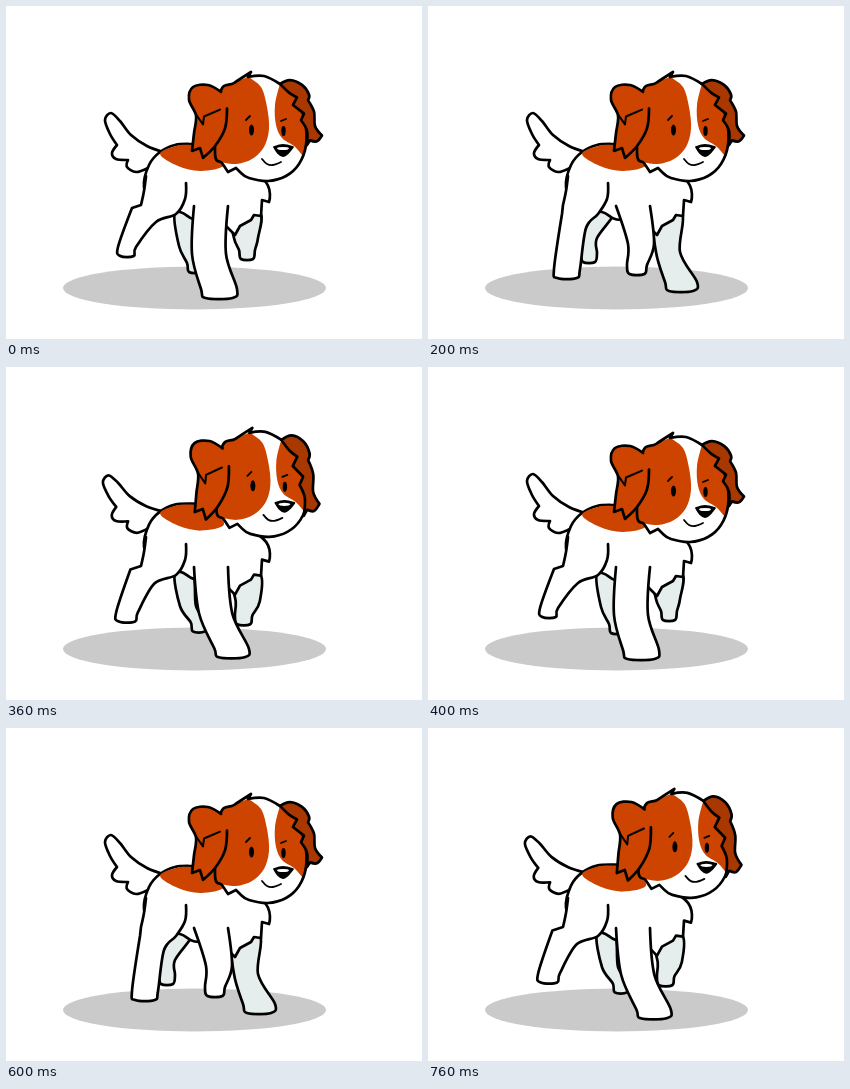
Recreate the animation shown at these times as an HTML page with a canvas. Size 416x333 px, loop 0.8 s.

```html
<!DOCTYPE html>
<html lang="en">
<head>
<meta charset="utf-8">
<title>Walking puppy</title>
<style>
html, body { margin: 0; width: 100%; height: 100%; overflow: hidden; background: #fff; }
canvas { display: block; }
</style>
</head>
<body>
<canvas id="stage" width="416" height="333"></canvas>
<script>
const ctx = document.getElementById('stage').getContext('2d');
const CYCLE = 400, STEP = 40;
const ORANGE = '#cc4400', DARK_ORANGE = '#a83800', GREY = '#e6eeed', WHITE = '#fff';

const point = (x, y, sharp = false) => ({ x, y, sharp });

// A "*" after a point makes it a sharp corner.
const parse = text => text.split(' ').map(p => {
  const [x, y] = p.replace('*', '').split(',').map(Number);
  return point(x, y, p.endsWith('*'));
});

const tail = parse('157,145 141,139 125,128 114,114 105,106 99,113 104,127 111,138* 106,146 110,152 122,153* 121,160 130,165 142,161');
const trunk = parse('200,138 186,137 169,138 154,145 143,158 138,180 148,202 174,205 187,212 206,214 219,218');
const chest = parse('219,218 229,228* 234,219* 245,213* 248,208* 255,209* 256,193* 263,195* 257,172 200,139');
const saddle = parse('154,147 170,139 186,138 205,140 218,158 195,164 172,159');
const skull = parse('214,86 228,76 245,65* 242,70* 258,69 274,77* 290,90 299,115 300,138 293,157 280,169 262,174 243,171 235,166* 230,161* 222,165* 216,156 209,146');
const leftPatch = parse('214,86 228,76 242,70* 255,80 261,100 263,122 258,140 246,152 230,157 215,155* 208,145');
const rightPatch = parse('274,77* 290,90 299,115 301,140* 297,149* 288,139 276,131 270,118 269,98');
const leftEar = parse('215,85 202,78 187,80 183,93 190,109 188,127 186,145* 194,142* 197,152* 209,140 219,122 221,102');
const tuft = parse('190,108 197,118* 198,110* 214,103');
const rightEar = parse('274,77 284,73 296,78 303,88 302,94* 308,106 309,121 316,131* 311,137 304,136* 301,141* 301,126 295,115* 298,108* 287,99* 291,91* 283,86 275,78');
const nose = parse('268,140* 277,138 287,140* 282,146 277,149 272,146');
const mouth = parse('256,152 261,157 267,158 275,155');
const brows = ['240,113 244,109', '275,114 280,112'].map(parse);

function trace(points, closed) {
  const n = points.length;
  const tangent = i => {
    if (points[i].sharp || (!closed && (i === 0 || i === n - 1))) return [0, 0];
    const a = points[(i + n - 1) % n], b = points[(i + 1) % n];
    return [(b.x - a.x) / 6, (b.y - a.y) / 6];
  };
  ctx.beginPath();
  ctx.moveTo(points[0].x, points[0].y);
  for (let i = 0; i < (closed ? n : n - 1); i++) {
    const j = (i + 1) % n, p = points[i], q = points[j];
    const [ax, ay] = tangent(i), [bx, by] = tangent(j);
    ctx.bezierCurveTo(p.x + ax, p.y + ay, q.x - bx, q.y - by, q.x, q.y);
  }
}

function draw(points, { fill, line = 2.7, closed = false }) {
  trace(points, closed);
  if (fill) { ctx.fillStyle = fill; ctx.fill(); }
  if (line) { ctx.lineWidth = line; ctx.stroke(); }
}

function oval(x, y, rx, ry, color) {
  ctx.fillStyle = color;
  ctx.beginPath();
  ctx.ellipse(x, y, rx, ry, 0, 0, 2 * Math.PI);
  ctx.fill();
}

function moved(x, y, angle, paint) {
  ctx.save();
  ctx.translate(x, y);
  ctx.rotate(angle);
  paint();
  ctx.restore();
}

const paw = (foot, w) => [
  point(foot.x - w, foot.y - 6), point(foot.x - 0.75 * w, foot.y + 3),
  point(foot.x + 0.75 * w, foot.y + 3), point(foot.x + w, foot.y - 6)];

const limb = (hip, hipW, knee, kneeW, foot, footW) => [
  point(hip.x - hipW, hip.y), point(knee.x - kneeW, knee.y),
  ...paw(foot, footW),
  point(knee.x + kneeW, knee.y), point(hip.x + hipW, hip.y)];

const hindLimb = (hock, foot, footW) => [
  point(180, 177), point(179, 193), point(170, 208), point(hock.x + 13, hock.y + 4),
  ...paw(foot, footW).reverse(),
  point(hock.x - 11, hock.y - 10, true), point(135, 199, true), point(138, 185), point(140, 170)];

// Ears follow the head at the top and trail behind it toward the tip.
const flap = (ear, head, trailX, trailY) => ear.map(p => {
  const k = (p.y - 76) / 68;
  return point(p.x + head.x * (1 + trailX * k), p.y + head.y * (1 + trailY * k), p.sharp);
});

function drawFace() {
  draw(skull, { fill: WHITE, line: 0, closed: true });
  draw(leftPatch, { fill: ORANGE, line: 0, closed: true });
  draw(rightPatch, { fill: ORANGE, line: 0, closed: true });
  draw(skull, { closed: true });
  oval(245.5, 123, 2.5, 5.5, '#000');
  oval(277.5, 124, 2.2, 5, '#000');
  for (const brow of brows) draw(brow, { line: 1.8 });
  draw(nose, { fill: '#000', line: 1.8, closed: true });
  oval(277, 141.5, 6, 1.6, WHITE);
  draw(mouth, { line: 1.8 });
}

function render(t) {
  const a = 2 * Math.PI * t / CYCLE;
  // One stride per cycle, with an optional second harmonic for two steps.
  const wave = (mean, c, s = 0, c2 = 0, s2 = 0) => mean +
    c * Math.cos(a) + s * Math.sin(a) + c2 * Math.cos(2 * a) + s2 * Math.sin(2 * a);

  const bob = wave(-1, 0, 0, 2);
  const wag = wave(-0.08, 0, 0, 0.08);
  const head = point(wave(2, 0, 0, -2), wave(-3, 0, 0, 4, 2.5));

  const farHind = limb(point(178, 206), 9,
    point(wave(171, 10, -5), wave(236, 4)), 8,
    point(wave(175, 14, -11), wave(258, 5, 1)), 8);
  const farFront = limb(point(240, 207), 14,
    point(wave(240, 0, 10, 0, -8), wave(239, -7, -2)), 12,
    point(wave(247, -6, 27, 0, -12), wave(266, -16, -2)), wave(12, -4));
  const nearFront = limb(point(205, 200), 17,
    point(wave(208, -5, -10), wave(243, 5)), wave(15, 2),
    point(wave(211, 2, -22), wave(277, 12, -1)), wave(14, 4));
  const nearHind = hindLimb(
    point(wave(141, -4, 4), wave(215, -3)),
    point(wave(136, -9, 10, -6), wave(258, -11, -4)), wave(11, -2, -2.5));

  ctx.fillStyle = WHITE;
  ctx.fillRect(0, 0, 416, 333);
  ctx.strokeStyle = '#000';
  ctx.lineCap = ctx.lineJoin = 'round';
  oval(188.5, 282, 131.5, 21.5, '#cacaca');

  moved(152, 152 + bob, wag, () => {
    ctx.translate(-152, -152);
    draw(tail, { fill: WHITE });
  });
  draw(farHind, { fill: GREY, closed: true });
  draw(farFront, { fill: GREY, closed: true });
  moved(0, bob, 0, () => {
    draw(trunk, { fill: WHITE });
    draw(chest, { fill: WHITE });
    draw(saddle, { fill: ORANGE, line: 0, closed: true });
  });
  draw(nearHind, { fill: WHITE });
  draw(nearFront, { fill: WHITE });
  moved(head.x, head.y, 0, drawFace);
  draw(flap(rightEar, head, -3.5, -3), { fill: DARK_ORANGE });
  draw(flap(leftEar, head, 1, -1), { fill: ORANGE });
  draw(flap(tuft, head, 1, -1), { line: 2 });
}

function frame() {
  const t = performance.now() % CYCLE;
  render(Math.floor(t / STEP) * STEP);
  requestAnimationFrame(frame);
}
frame();
</script>
</body>
</html>
```
